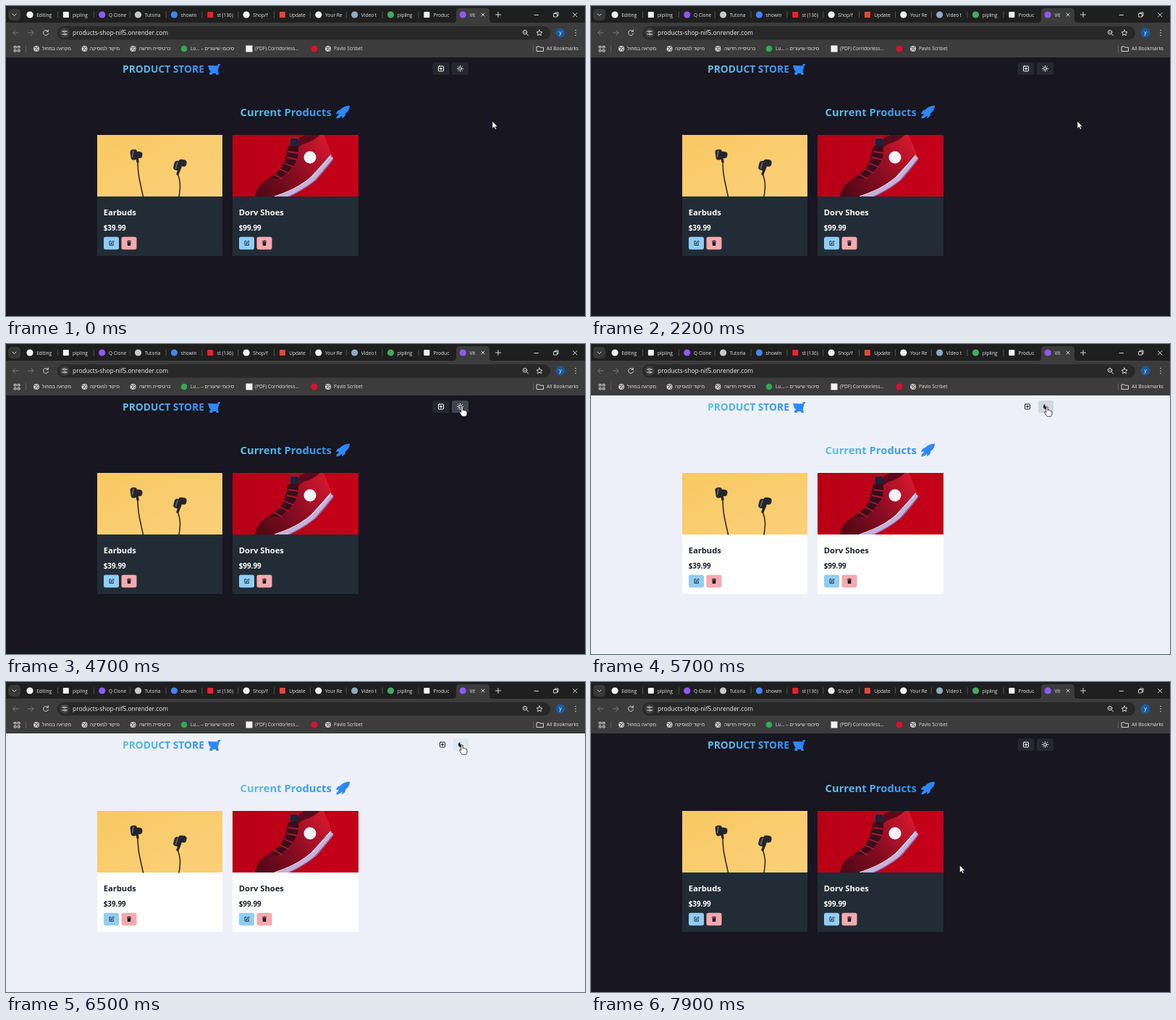
These frames come from a looping animation (800x428 px, 8 s). An HTML page:

```html
<!DOCTYPE html>
<html lang="en">
<head>
<meta charset="utf-8">
<title>Product Store</title>
<style>
html, body { margin: 0; width: 100%; height: 100%; overflow: hidden; background: #171621; }
svg { display: block; width: 800px; height: 428px; font-family: "Open Sans", "Noto Sans", sans-serif; }
text { white-space: pre; }
.ui { font-size: 6.6px; fill: #e3e3e3; }
.url { font-size: 8.4px; fill: #f0f0f0; }
.line { fill: none; stroke: #d6d6d6; stroke-width: 1; stroke-linecap: round; stroke-linejoin: round; }
.dim { stroke: #7b7b7b; }
.bold { font-weight: 700; }
.ink { fill: var(--ink); }
.ink-line { fill: none; stroke: var(--ink); stroke-width: 1; stroke-linecap: round; stroke-linejoin: round; }
.dark-line { fill: none; stroke: #1a202c; stroke-width: .9; stroke-linecap: round; stroke-linejoin: round; }
</style>
</head>
<body>
<svg id="stage" viewBox="0 0 800 428">
  <defs>
    <linearGradient id="brand" gradientUnits="userSpaceOnUse" x1="161" x2="296">
      <stop stop-color="#62c0e2"/><stop offset=".5" stop-color="#42a7ec"/><stop offset="1" stop-color="#2b83fb"/>
    </linearGradient>
    <linearGradient id="title" gradientUnits="userSpaceOnUse" x1="324" x2="475">
      <stop stop-color="#62c0e2"/><stop offset=".5" stop-color="#42a7ec"/><stop offset="1" stop-color="#2b83fb"/>
    </linearGradient>
    <linearGradient id="sand" x2="1" y2="1">
      <stop stop-color="#f8c964"/><stop offset="1" stop-color="#fad078"/>
    </linearGradient>
    <linearGradient id="crimson" x2="1">
      <stop stop-color="#b80016"/><stop offset="1" stop-color="#c50119"/>
    </linearGradient>
    <linearGradient id="mesh" gradientUnits="userSpaceOnUse" x1="345" y1="262" x2="450" y2="190">
      <stop stop-color="#4d0816"/><stop offset=".5" stop-color="#8a0c22"/><stop offset="1" stop-color="#d8192f"/>
    </linearGradient>
    <clipPath id="shoeBox"><rect x="313" y="178" width="174" height="85"/></clipPath>
    <g id="globe">
      <circle r="4" fill="#d6d6d6"/>
      <path d="M-3 -1.5Q-1 -2.5 0 -1Q1 .5 -1 .8Q-1.5 2 -2 2.5M1 -3Q.8 -1.6 2.8 -1M1 2.8Q1 1 3 1" fill="none" stroke="#3c3c3c" stroke-width="1"/>
    </g>
    <g id="actions">
      <rect width="21" height="17.5" rx="2.6" fill="#90cdf4"/>
      <path class="dark-line" d="M10 6H8V11.6H13.4V9.4M10 9.8L10.3 8.3L13.2 5.4L14.3 6.5L11.4 9.5Z"/>
      <rect x="24.5" width="21" height="17.5" rx="2.6" fill="#f6a9ae"/>
      <path fill="#1a202c" d="M32 5.6H34L34.4 4.8H35.6L36 5.6H38V6.5H32ZM32.5 7H37.5L37.1 12.4H32.9Z"/>
    </g>
  </defs>

  <!-- browser -->
  <rect width="800" height="24" fill="#1f1f1f"/>
  <rect y="23" width="800" height="48" fill="#3c3c3c"/>
  <rect x="3" y="4" width="17" height="16" rx="5" fill="#383838"/>
  <path class="line" d="M9 11L11.5 13.5L14 11"/>
  <path d="M618 23Q622 23 622 19V8Q622 3 627 3H663Q668 3 668 8V19Q668 23 672 23Z" fill="#3c3c3c"/>
  <g id="tabs"></g>
  <path class="line" d="M657 10L661 14M661 10L657 14M676.5 12H683.5M680 8.5V15.5M730 12.5H735.5M783.5 9.5L789 15M789 9.5L783.5 15M757 10.5H761.5V15H757ZM758.5 10.5V9H763V13.5H761.5"/>
  <path class="line dim" d="M17 37H9.5M13 33.5L9.5 37L13 40.5M30.5 37H38M34.5 33.5L38 37L34.5 40.5"/>
  <path class="line" d="M58 35A3.5 3.5 0 1 0 58.5 38M58.3 33V35.3H56"/>
  <rect x="71" y="28" width="681" height="18.5" rx="9.2" fill="#282828"/>
  <circle cx="81" cy="37" r="7" fill="#3c3c3c"/>
  <path class="line" d="M77.5 35H79M82 35H84.5M77.5 39H80M83 39H84.5"/>
  <circle class="line" cx="80.5" cy="35" r="1.2"/><circle class="line" cx="81.5" cy="39" r="1.2"/>
  <text class="url" x="92" y="40">products-shop-nif5.onrender.com</text>
  <circle class="line" cx="717" cy="36.2" r="2.8"/>
  <path class="line" d="M719.2 38.4L721.5 40.8M716 36.2H718M737 33L738.2 35.7L741 36L738.9 37.9L739.5 40.7L737 39.2L734.5 40.7L735.1 37.9L733 36L735.8 35.7Z"/>
  <circle cx="766" cy="37" r="6.5" fill="#1b5a9c"/>
  <text x="766" y="39" font-size="7" fill="#fff" text-anchor="middle">y</text>
  <path d="M787 33.5v.01M787 37v.01M787 40.5v.01" stroke="#d6d6d6" stroke-width="1.6" stroke-linecap="round"/>
  <path class="line" d="M11.5 55.5H14V58H11.5ZM16.5 55.5H19V58H16.5ZM11.5 60.5H14V63H11.5ZM16.5 60.5H19V63H16.5Z"/>
  <path d="M27.5 54V64M728.5 54V64" stroke="#5d5d5d"/>
  <use href="#globe" x="42" y="59"/><use href="#globe" x="108.5" y="59"/>
  <use href="#globe" x="175.500" y="59"/><use href="#globe" x="445" y="59"/>
  <circle cx="246" cy="59" r="4.3" fill="#35a853"/>
  <rect x="331.5" y="54.5" width="9" height="9" fill="#f2f2f2"/>
  <circle cx="426" cy="59" r="4.5" fill="#d8122f"/>
  <path class="line" d="M733.5 56H737L738 57.2H742.5V62.5H733.5Z"/>
  <g id="marks"></g>

  <!-- page -->
  <rect y="71" width="800" height="357" fill="var(--bg)"/>
  <text class="bold" x="161" y="92" font-size="13.8" fill="url(#brand)">PRODUCT STORE</text>
  <path fill="url(#brand)" d="M279 82L292 82.5L293 80H296V82L294.5 82.5L292.7 90.5L293.5 92L293.8 95H290.6L290 93H285.5L285 95H281.5L281 92.5L283 90.5L281 88.5Z"/>
  <text class="bold" x="323.5" y="152" font-size="14.8" fill="url(#title)">Current Products</text>
  <path fill="url(#title)" d="M475 137.5Q466 138 461.5 143.5Q457.5 143.5 456 149L460 148.5L459 151Q456 152 456.5 155.5Q460.5 155 462.5 153L464.5 151.5L464 155Q469.5 152.5 469 148.5Q475 144 475 137.5Z"/>

  <g id="add">
    <rect x="589.5" y="78" width="23" height="17" rx="2.6" fill="var(--btn)"/>
    <path class="ink-line" d="M598.5 83H603.7Q604.5 83 604.5 83.8V89.2Q604.5 90 603.7 90H598.3Q597.5 90 597.5 89.2V83.8Q597.5 83 598.5 83ZM599.3 86.5H602.7M601 84.8V88.2"/>
  </g>
  <rect id="mode" y="78" height="17" rx="2.6"/>
  <g id="sun">
    <circle class="ink-line" cx="627.5" cy="86.5" r="1.9"/>
    <path id="rays" class="ink-line"/>
  </g>
  <path id="moon" class="ink" d="M627.3 83A3.7 3.7 0 1 0 632 87.7A4 4 0 0 1 627.3 83Z"/>

  <g id="cards"></g>
  <rect x="126" y="178" width="173" height="85" fill="url(#sand)"/>
  <g fill="none" stroke="#2b241c" stroke-linecap="round">
    <path stroke-width="1.5" d="M182 213Q182 228 184.500 240T189.500 263M237 231Q241 242 240.500 250T239 263"/>
    <path stroke-width="3.400" d="M180.500 206L182 215M241 222L237 232"/>
  </g>
  <g fill="#25262c">
    <rect x="172" y="198" width="9.500" height="14.500" rx="3.600" transform="rotate(-8 177 205)"/>
    <rect x="179" y="201" width="9.500" height="9" rx="4" transform="rotate(12 184 205)"/>
    <rect x="232" y="214" width="9.500" height="13" rx="3.600" transform="rotate(14 237 220)"/>
    <rect x="238" y="212" width="11.500" height="9.500" rx="4" transform="rotate(8 244 217)"/>
  </g>
  <path d="M176 200L174.500 208M237 216L234.500 224" fill="none" stroke="#696a6e" stroke-width="1.600" stroke-linecap="round"/>

  <g clip-path="url(#shoeBox)">
    <rect x="313" y="178" width="174" height="85" fill="url(#crimson)"/>
    <path fill="url(#mesh)" d="M344 263Q347 246 362 238L378 226Q387 210 389 194L391 181Q398 177 405 182L412 178H439Q446 194 451 208Q440 228 420 246Q404 258 384 263Z"/>
    <path fill="#5b0a1b" d="M405 182L413 178H434Q424 187 412 190Q406 192 401 200Z"/>
    <path fill="#3a0c1a" d="M390 194L402 191Q407 202 400 216Q391 231 376 239L366 238Q381 227 386 214Z"/>
    <path fill="none" stroke="#a81a31" stroke-width="1.800" d="M390 201L404 203M388 209L402 212M384 217L397 222M378 225L391 231M370 232L382 239"/>
    <path fill="none" stroke="#c4b3dc" stroke-width="6" d="M374 266Q405 256 424 239Q439 222 450 208"/>
    <path fill="none" stroke="#f0e9f7" stroke-width="1.300" d="M371 263Q403 253 422 236Q436 221 449 206"/>
    <path fill="none" stroke="#8b76b6" stroke-width="1.300" d="M384 266Q411 254 428 240Q443 223 452 211"/>
    <rect x="393" y="183" width="11" height="10" rx="2" fill="#1d2338"/>
    <circle cx="420" cy="209" r="8.500" fill="#f7f5f8"/>
  </g>

  <path id="arrow" fill="#fff" stroke="#111" stroke-width=".6" d="M0 0V10.2L2.4 8L4.1 11.5L5.7 10.7L4.1 7.4H7.3Z"/>
  <path id="hand" fill="#fff" stroke="#111" stroke-width=".8" stroke-linejoin="round" d="M-1.2 .5Q0 -1.5 1.2 .5V4.5Q2.6 3.6 3.3 5Q4.8 4.3 5.3 5.7Q7 5.3 7 7V10Q6.5 12 5.5 13H.3Q-1 11.5 -2.3 9.3L-3.7 7.1Q-3.3 5.5 -1.2 7.3Z"/>
</svg>

<script>
const $ = id => document.getElementById(id);
const LOOP = 8000;
const toggles = [5000, 5750, 6250, 7200];
const hoverIn = 4250, hoverOut = 7680;
const path = [
  [0, 672, 159], [3250, 672, 159], [3500, 662, 124],
  [3800, 650, 106], [4250, 630, 87], [7600, 630, 87], [7900, 509.5, 253], [8000, 509.5, 253]
];
const themes = [
  { bg: '#171621', card: '#222c37', ink: '#ffffff', btn: [38, 39, 49], hover: [66, 69, 78], active: [82, 84, 94] },
  { bg: '#edf0f8', card: '#ffffff', ink: '#1a202c', btn: [237, 240, 248], hover: [225, 231, 239], active: [210, 215, 223] }
];

const tabs = [
  ['Editing', '#f4f4f4'], ['pipling', '#f4f4f4', 1], ['Q Clone', '#8f59f5'], ['Tutoria', '#c9c9c9'],
  ['showin', '#4285f4'], ['st (136)', '#f0202c', 1], ['Shop/f', '#f4f4f4'], ['Update', '#e0483c', 1],
  ['Your Re', '#f4f4f4'], ['Video t', '#8eabc4'], ['pipling', '#45a866'], ['Produc', '#f4f4f4', 1], ['Vit', '#8f59f5']
];
$('tabs').innerHTML = tabs.map(([label, color, square], i) => {
  const x = 33 + i * 49.85;
  const icon = square
    ? `<rect x="${x - 4}" y="8" width="8" height="8" rx="1" fill="${color}"/>`
    : `<circle cx="${x}" cy="12" r="4.6" fill="${color}"/>`;
  const rule = i < 11 ? `<path d="M${x + 38.5} 7.5V16.5" stroke="#555"/>` : '';
  return `${icon}<text class="ui" x="${x + 9.2}" y="14.6">${label}</text>${rule}`;
}).join('');

const marks = [
  [50, 'מקראה במחול'], [116, 'מיקוד למוסיקה'], [184, 'כרטיסייה חדשה'], [255, 'Lu... – סיכומי שיעורים'],
  [344, '(PDF) Corridorless...'], [453, 'Pavlo Scribet'], [747, 'All Bookmarks']
];
$('marks').innerHTML = marks.map(([x, label]) => `<text class="ui" x="${x}" y="61.3">${label}</text>`).join('');

const cards = [[126, 173, 'Earbuds', '$39.99'], [313, 174, 'Dorv Shoes', '$99.99']];
$('cards').innerHTML = cards.map(([x, w, name, price]) => `
  <rect x="${x}" y="178" width="${w}" height="167" fill="var(--card)"/>
  <text class="bold ink" x="${x + 8.7}" y="288.8" font-size="11.2">${name}</text>
  <text class="bold ink" x="${x + 8.7}" y="309.8" font-size="9.9">${price}</text>
  <use href="#actions" x="${x + 9}" y="318.7"/>`).join('');

$('rays').setAttribute('d', Array.from({ length: 8 }, (_, i) => {
  const a = i * Math.PI / 4;
  const at = r => `${627.5 + r * Math.cos(a)} ${86.5 + r * Math.sin(a)}`;
  return `M${at(3.4)}L${at(4.1)}`;
}).join(''));

const clamp = v => Math.min(1, Math.max(0, v));
const ease = v => v * v * (3 - 2 * v);
const mix = (a, b, k) => a.map((v, i) => v + (b[i] - v) * k);
const rgb = c => `rgb(${c.map(Math.round).join()})`;
const show = (id, on) => $(id).setAttribute('visibility', on ? 'visible' : 'hidden');

function cursorAt(t) {
  let i = 0;
  while (i < path.length - 2 && t >= path[i + 1][0]) i++;
  const [t0, ...a] = path[i], [t1, ...b] = path[i + 1];
  return mix(a, b, ease(clamp((t - t0) / (t1 - t0))));
}

// The mode button darkens while pressed, just before each theme change.
function modeColor(t, theme) {
  if (toggles.some(at => t >= at - 100 && t < at)) return theme.active;
  const over = clamp((t - hoverIn) / 200) * (1 - clamp((t - hoverOut) / 200));
  return mix(theme.btn, theme.hover, ease(over));
}

function render(t) {
  const light = toggles.filter(at => t >= at).length % 2;
  const theme = themes[light];
  const style = $('stage').style;
  style.setProperty('--bg', theme.bg);
  style.setProperty('--card', theme.card);
  style.setProperty('--ink', theme.ink);
  style.setProperty('--btn', rgb(theme.btn));

  $('add').setAttribute('transform', `translate(${light * 2} 0)`);
  $('mode').setAttribute('x', 616 + light * 2);
  $('mode').setAttribute('width', 23 - light * 2);
  $('mode').setAttribute('fill', rgb(modeColor(t, theme)));
  show('sun', !light);
  show('moon', light);

  const [x, y] = cursorAt(t);
  const over = x > 616 && x < 639 && y > 78 && y < 95;
  show('hand', over);
  show('arrow', !over);
  $(over ? 'hand' : 'arrow').setAttribute('transform', `translate(${x} ${y})`);
}

function tick(now) {
  render(now % LOOP);
  requestAnimationFrame(tick);
}
render(0);
requestAnimationFrame(tick);
</script>
</body>
</html>
```
